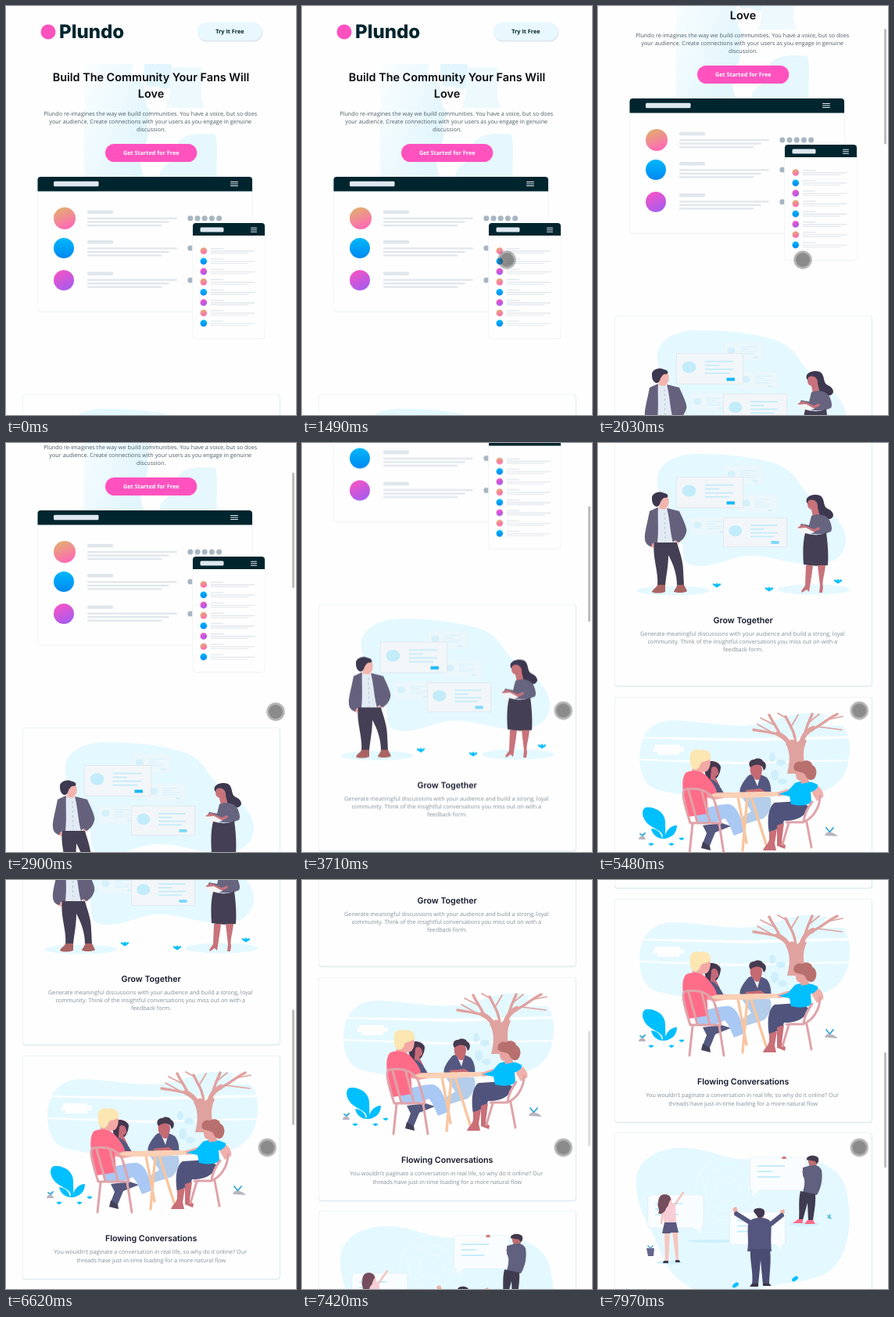
Animation, 371 px wide and 522 px high, one loop 8000 ms. Source, as an HTML page:

```html
<!DOCTYPE html>
<html lang="en">
<head>
<meta charset="utf-8">
<title>Plundo landing page</title>
<style>
html, body { margin: 0; width: 100%; height: 100%; overflow: hidden; background: #fefefe; }
svg { position: absolute; left: 0; top: 0; display: block; }
text { text-rendering: geometricPrecision; }
.logo { font: 800 24px Inter, sans-serif; fill: #00252e; }
.head { font: 600 14.4px Inter, sans-serif; fill: #080a10; text-anchor: middle; }
.title { font: 600 10.65px Inter, sans-serif; fill: #12172a; text-anchor: middle; }
.copy { font: 400 7.27px "Open Sans", sans-serif; fill: #4c5d66; text-anchor: middle; }
.soft { fill: #82909a; }
.btn { font: 700 7.27px "Open Sans", sans-serif; text-anchor: middle; }
.line { fill: none; stroke-linecap: round; stroke-linejoin: round; }
</style>
</head>
<body>
<svg width="371" height="522" viewBox="0 0 371 522">
  <defs>
    <linearGradient id="orange" x1=".2" y1="0" x2=".6" y2="1"><stop stop-color="#e2b06c"/><stop offset="1" stop-color="#ff68b8"/></linearGradient>
    <linearGradient id="blue" x1="0" y1="0" x2="0" y2="1"><stop stop-color="#00b8fa"/><stop offset="1" stop-color="#0088f2"/></linearGradient>
    <linearGradient id="purple" x1=".2" y1="0" x2=".7" y2="1"><stop stop-color="#f853c4"/><stop offset="1" stop-color="#a45cf0"/></linearGradient>
    <linearGradient id="haze" x1="0" y1="0" x2="1" y2=".6"><stop stop-color="#fbfeff"/><stop offset="1" stop-color="#e0f5fc"/></linearGradient>
    <g id="sprout" fill="#00bfff">
      <ellipse rx="1.4" ry="3" cy="-1.5"/>
      <ellipse rx="1.4" ry="3.4" transform="rotate(-58) translate(0 -2.6)"/>
      <ellipse rx="1.4" ry="3.4" transform="rotate(58) translate(0 -2.6)"/>
    </g>
    <g id="bubble">
      <rect width="71" height="42" rx="3" fill="#fafdff" stroke="#e0edf3" stroke-width=".7"/>
      <path class="line" stroke="#c6edfa" stroke-width="2" d="M10 11H44M10 18H28M10 25H38"/>
    </g>
  </defs>

  <g id="page">
    <!-- hero -->
    <path fill="url(#haze)" d="M100 74H163C158 88 164 96 176 98C180 112 176 128 186 136C176 150 186 164 178 176C168 186 172 205 176 218H100Z"/>
    <path fill="#e4f6fd" d="M177 74H212V104C203 110 196 100 188 103C180 106 176 98 177 74Z"/>
    <path fill="#eef9fe" d="M212 78H250C254 100 246 112 254 130H204C212 118 208 98 212 78Z"/>
    <path fill="#e6f7fd" d="M196 218C198 200 214 204 216 186C218 168 232 160 268 164C272 182 268 200 270 218Z"/>
    <circle cx="54" cy="33" r="9.5" fill="#ff52bf"/>
    <text class="logo" x="68" y="41">Plundo</text>
    <rect x="245.5" y="22.5" width="83" height="23" rx="11.5" fill="#dde5e9"/>
    <rect x="245" y="21" width="82.5" height="23" rx="11.5" fill="#e8f8fe"/>
    <text class="btn" x="286.4" y="35.2" fill="#00252e">Try It Free</text>
    <text class="head"><tspan x="185.5" y="96">Build The Community Your Fans Will</tspan><tspan x="185.5" y="117">Love</tspan></text>
    <text class="copy">
      <tspan x="185.7" y="140.2">Plundo re-imagines the way we build communities. You have a voice, but so does</tspan>
      <tspan x="185.7" y="150.2">your audience. Create connections with your users as you engage in genuine</tspan>
      <tspan x="185.7" y="160.2">discussion.</tspan>
    </text>
    <rect x="127" y="176" width="117.3" height="23" rx="11.5" fill="#ff52bf"/>
    <text class="btn" x="185.7" y="190.2" fill="#fff">Get Started for Free</text>
    <g id="mock"></g>

    <!-- card 1 -->
    <g class="card" data-y="496" data-h="314"></g>
    <g transform="translate(0 418)">
      <g fill="#e4f8ff">
        <path d="M76 125C78 108 100 96 125 96C160 96 185 98 215 105C240 111 250 120 260 137C275 160 318 175 317 207C315 230 296 238 272 237C240 236 218 224 190 226C165 229 150 240 128 239C105 238 110 225 107 200C103 170 72 155 76 125Z"/>
        <ellipse cx="96" cy="270.5" rx="46.5" ry="6"/><ellipse cx="276" cy="269" rx="46.5" ry="6.5"/>
      </g>
      <g id="screens"></g>
      <!-- man -->
      <path fill="#f2b5ae" d="M79 153L89 150C92 156 91 163 87 165L86 174H77Z"/>
      <path fill="#3d3850" d="M69 153C68 146 78 142 85 146C90 147 91 151 87 152C83 151 82 155 80 157C79 161 77 164 74 163C70 161 69 157 69 153Z"/>
      <path fill="#e2eaf3" d="M77 166L90 167L97 210H73Z"/>
      <path class="line" stroke="#9aa9ba" stroke-width=".9" stroke-dasharray="1 5" d="M85 172L86 208"/>
      <path fill="#ecaaa4" d="M66 207L73 210L71 216L66 214ZM99 204L105 208L98 211Z"/>
      <path fill="#65617d" d="M77 164L66 169C63 185 59 198 60 204C60 209 63 213 68 214L70 210L76 209C78 192 76 178 77 164ZM88 165L104 169C109 180 115 192 113 196C111 203 107 207 103 209L99 206L96 209C92 196 92 180 88 165Z"/>
      <path fill="#443f54" d="M72 209H101C104 220 109 232 109 245L110 264H101C101 250 97 238 90 225C90 240 87 252 86 264H76C78 248 69 226 72 209Z"/>
      <path fill="#a96462" d="M76 263H86L86 272C80 274 72 274 69 272C70 268 75 267 76 263ZM101 263H110L114 271C110 274 100 273 97 272C97 269 101 267 101 263Z"/>
      <!-- woman -->
      <path fill="#3d3850" d="M267 158C264 150 276 146 284 149C291 153 287 163 294 166C301 169 304 176 297 179C287 180 281 174 277 168Z"/>
      <path fill="#c8737b" d="M269 156C276 152 282 157 281 164L284 176L275 177L273 167C268 166 267 161 269 156Z"/>
      <path fill="#676480" d="M273 175C282 171 292 174 296 180C299 187 300 192 298 195C288 200 275 199 265 196L257 191L260 185L270 187Z"/>
      <path fill="#c8737b" d="M255 190L262 186L276 192L283 189L284 192L272 198Z"/>
      <path fill="#f2f5f8" d="M254 191L266 190L277 196L264 201Z"/>
      <path fill="#443f54" d="M265 197C276 200 286 200 292 196C294 210 295 225 294 238C284 239 273 239 263 237C262 223 262 208 265 197Z"/>
      <path fill="#c8737b" d="M266 238H275C274 248 272 258 271 266L270 272L267 269L261 273L260 271L265 264ZM281 238H291C290 250 286 260 288 266L287 273H283L284 264Z"/>
      <use href="#sprout" x="152" y="265"/><use href="#sprout" x="219" y="270"/><use href="#sprout" x="307" y="260"/>
    </g>
    <text class="title" x="185.7" y="730.3">Grow Together</text>
    <text class="copy soft">
      <tspan x="185.7" y="745.9">Generate meaningful discussions with your audience and build a strong, loyal</tspan>
      <tspan x="185.7" y="755.9">community. Think of the insightful conversations you miss out on with a</tspan>
      <tspan x="185.7" y="765.9">feedback form.</tspan>
    </text>

    <!-- card 2 -->
    <g class="card" data-y="824.5" data-h="284.5"></g>
    <g transform="translate(0 600)">
      <path fill="#e4f8ff" d="M53 300C54 270 70 253 100 254C140 256 165 263 200 260C225 257 240 247 262 245C295 243 322 252 322 290C322 330 300 345 270 348C200 356 100 352 72 341C58 334 53 318 53 300Z"/>
      <path fill="#fefefe" d="M54 275L190 277L322 274V277L190 281L54 277ZM53 303L180 307L322 304V306L180 310L53 305ZM73 285H105V288H110V294H104V298H76V294H71V289H73ZM289 249H322V261H288V256H294V253H289Z"/>
      <!-- tree -->
      <path fill="#dfa29f" d="M242 322C246 306 246 294 240 284L248 278L255 282L262 276L267 280C261 292 262 306 268 322Z"/>
      <g class="line" stroke="#dfa29f">
        <path stroke-width="6" d="M246 286C241 277 236 274 230 271M260 284C262 273 267 268 275 264"/>
        <path stroke-width="3.4" d="M231 272C220 269 210 268 199 266M233 273C229 262 224 258 219 247M253 284C252 268 246 262 240 249M264 274C266 262 270 256 274 246M274 265C284 262 290 254 306 246"/>
        <path stroke-width="1.7" d="M222 269L204 259M226 260L208 251M247 262L256 247M268 258L283 246M280 262L312 266M293 253L313 249M241 251L230 245"/>
      </g>
      <g fill="#cfeffa"><ellipse cx="223" cy="301" rx="4" ry="6"/><ellipse cx="234" cy="308" rx="6" ry="4"/><ellipse cx="226" cy="324" rx="5" ry="7"/><ellipse cx="236" cy="332" rx="6" ry="4"/></g>
      <!-- seated at the back -->
      <path fill="#45364f" d="M135 311C140 303 154 305 157 313C157 320 153 330 145 332L138 326Z"/>
      <path fill="#c46a78" d="M145 315C149 310 155 315 154 323L150 326L156 338L143 338Z"/>
      <path fill="#55587f" d="M144 329C152 331 156 338 161 347L140 350Z"/>
      <path fill="#545881" d="M193 324C202 321 210 323 216 327C221 333 222 342 221 349H183C178 343 186 331 193 324Z"/>
      <path fill="#f0f3f8" d="M198 324L208 323L204 338Z"/>
      <path fill="#c56a72" d="M195 312C198 307 210 309 210 316C210 322 208 325 207 329C204 331 200 330 199 326C195 324 194 318 195 312ZM188 343L208 341L214 345L194 349Z"/>
      <path fill="#453a50" d="M195 314C191 309 195 303 200 304C204 301 210 303 211 306C216 308 216 315 212 318L210 313C205 309 200 310 195 314Z"/>
      <path fill="#b4cdea" d="M184 352H220C224 360 220 372 212 379L186 387L177 382L196 370Z"/>
      <!-- left -->
      <path fill="#55587f" d="M134 388L158 385L170 389L150 397L143 414L134 411L139 398Z"/>
      <path fill="#424058" d="M134 409L143 414L144 420L132 417Z"/>
      <path fill="#a9c8f3" d="M126 368C142 366 156 360 168 361C180 365 183 380 187 396L174 401C170 392 167 384 162 379C152 385 140 387 126 386Z"/>
      <path fill="#f2a9a5" d="M122 306L143 302C145 308 143 316 139 319L134 320L133 327L120 322ZM139 345L152 346L176 346L178 350L150 355L136 352Z"/>
      <path fill="#fce6b2" d="M118 300C117 292 126 290 131 292C137 290 145 293 144 303C140 307 133 305 131 310C129 317 123 319 120 314C117 309 118 304 118 300Z"/>
      <path fill="#ff6c88" d="M112 321C120 316 132 318 138 324C144 330 150 338 152 345L141 352L139 348L141 373L116 377C113 360 103 334 112 321Z"/>
      <!-- table -->
      <path class="line" stroke="#f8c5a0" stroke-width="3.4" d="M179 352L190 410M191 352L185 420M196 352L215 412"/>
      <path fill="#fbd0b6" d="M140 349C160 345 225 344 243 346C246 349 222 352 185 353C160 353 142 352 140 349Z"/>
      <!-- right -->
      <path fill="#50547c" d="M258 357L270 364C266 378 250 383 238 382L236 388L230 392L219 398C216 380 218 364 226 359Z"/>
      <path fill="#c96f78" d="M219 396L229 393L226 411L228 420H211C213 414 218 412 219 406ZM229 388L238 385L235 408L240 414L239 418L229 414Z"/>
      <path fill="#f0b1ab" d="M229 346L244 341L250 348L231 351ZM274 334C284 337 290 346 288 352L280 357L274 347Z"/>
      <path fill="#00bfff" d="M252 334C262 330 274 332 281 336C282 341 276 345 272 345L273 358C268 364 254 363 247 361L245 351L231 348L243 344Z"/>
      <path fill="#e6a3a0" d="M253 318L267 316L270 333L260 335L259 331C254 331 252 325 253 318Z"/>
      <path fill="#b8706e" d="M251 317C248 309 256 305 261 307C266 303 274 306 274 311C280 313 281 322 277 328C273 332 267 330 265 323C262 319 256 321 251 317Z"/>
      <g class="line" stroke="#dfa3a9" stroke-width="3">
        <path d="M118 385C112 366 105 343 112 342C130 339 146 345 150 360L157 385ZM116 344L127 384M133 345L143 384M121 386L117 424M155 386L161 424"/>
        <path d="M284 350C284 366 274 380 262 384H241M274 358C268 366 264 374 263 383M267 384L273 416M244 385L236 412"/>
      </g>
      <path fill="#00bfff" d="M82 405C86 396 74 394 65 387C55 379 55 366 62 365C74 364 86 372 86 384C86 392 87 398 85 405ZM85 405C86 396 92 388 101 388C101 398 94 404 85 405ZM82 405C74 404 69 398 68 392C76 393 81 397 82 405Z"/>
      <use href="#sprout" transform="translate(68 413) scale(.65)"/><use href="#sprout" transform="translate(107 406) scale(.65)"/><use href="#sprout" transform="translate(94 413) scale(.65)"/>
      <path fill="#b9b4bf" d="M52 406C52 401 60 400 61 406ZM290 401C292 394 301 396 307 402Z"/>
      <path class="line" stroke="#36a8d8" stroke-width="1.8" d="M57 401L54 399M57 401L60 398M296 396L292 391M297 396L301 391"/>
    </g>
    <text class="title" x="185.7" y="1060.9">Flowing Conversations</text>
    <text class="copy soft">
      <tspan x="185.7" y="1077.2">You wouldn't paginate a conversation in real life, so why do it online? Our</tspan>
      <tspan x="185.7" y="1087.6">threads have just-in-time loading for a more natural flow</tspan>
    </text>

    <!-- card 3 -->
    <g class="card" data-y="1123" data-h="290"></g>
    <g transform="translate(0 800)">
      <path fill="#e4f8ff" d="M49 385C49 355 80 340 115 342C150 345 165 359 200 356C240 351 302 350 316 390C326 425 325 478 295 500C260 520 220 510 190 530C150 545 115 520 98 505C80 485 78 465 67 445C57 428 49 410 49 385Z"/>
      <g fill="none" stroke="#f2fbff" stroke-width=".8"><circle cx="165" cy="394" r="16"/><circle cx="165" cy="394" r="28"/><circle cx="165" cy="394" r="40"/></g>
      <ellipse cx="145" cy="461" rx="31" ry="2" fill="#cdf0fc"/>
      <ellipse cx="264" cy="439" rx="20" ry="3" fill="#d2f1fb"/>
      <ellipse cx="92" cy="488" rx="17" ry="2.5" fill="#d2f1fb"/>
      <use href="#bubble" x="64" y="402"/><use href="#bubble" x="168.5" y="423.5"/><use href="#bubble" x="194.5" y="354"/>
      <path fill="#fafdff" d="M122 443L132 451V443ZM228 465L235 473V465ZM198 395V404L207 395Z"/>
      <!-- woman -->
      <path class="line" stroke="#f3c6bf" stroke-width="2.6" d="M97 416L109 399M83 422L81 438"/>
      <path fill="#f3c6bf" d="M88 406H94L95 415L88 417Z"/>
      <path fill="#f9cdd6" d="M84 416C89 411 96 412 99 415L100 438H85C83 430 82 422 84 416Z"/>
      <path fill="#f3c6bf" d="M85 449H92L90 487H86ZM95 449H102L103 486H100Z"/>
      <path fill="#5b597f" d="M85 437H100L103 450H94L92 451H82Z"/>
      <path fill="#754d5c" d="M80 403C85 399 94 402 93 408C90 411 91 416 87 419C86 424 80 428 77 425C80 420 75 417 77 412C77 408 78 405 80 403Z"/>
      <path fill="#3f3b50" d="M84 486H90V489H83ZM99 485H104L105 488H99Z"/>
      <path fill="#66658a" d="M62 470H72L71 480H64Z"/><path class="line" stroke="#55a5c8" stroke-width="1.5" d="M67 470L64 467M67 470L70 467"/>
      <!-- speaker -->
      <path fill="#f0b0a8" d="M172 419L177 417L179 423L174 425ZM202 423H212V434H204ZM233 422L238 420L239 425L234 427Z"/>
      <path fill="#403750" d="M199 422C201 417 213 418 213 423C214 429 209 432 205 431C203 427 200 426 199 422Z"/>
      <path class="line" stroke="#55567f" stroke-width="6" d="M177 426L196 438M235 428L220 440"/>
      <path fill="#55567f" d="M194 435C200 430 213 430 219 434C224 439 220 450 222 474H191C194 460 189 442 194 435Z"/>
      <path fill="#4b4c74" d="M195 471H220C222 488 219 503 219 517H211L208 485L205 517H197C199 500 194 487 195 471Z"/>
      <path fill="#3b3448" d="M197 515H205V519H194ZM211 515H219L222 518H211Z"/>
      <!-- man -->
      <path fill="#bd6e70" d="M268 356L280 355C282 363 279 368 271 367ZM261 372L265 368L267 373L263 376Z"/>
      <path fill="#43384c" d="M267 357C266 351 279 350 282 355C283 361 280 364 278 359Z"/>
      <path fill="#60607f" d="M262 367C272 364 281 361 286 370C288 382 285 394 280 402H261C264 392 266 384 262 377Z"/>
      <path fill="#3f3b50" d="M259 397L278 401C279 414 276 425 275 435H269L268 412L262 434H257C258 420 256 408 259 397Z"/>
      <path fill="#ff6c88" d="M256 433H262V438H249ZM268 434H275L278 439H264Z"/>
      <path fill="#d27b80" d="M235 356C236 351 241 352 241 356Z"/>
      <g fill="#00bfff"><ellipse cx="176" cy="517" rx="4.5" ry="2.4" transform="rotate(-35 176 517)"/><ellipse cx="252" cy="509" rx="4.5" ry="2.4" transform="rotate(-35 252 509)"/></g>
      <path class="line" stroke="#3ab5dc" stroke-width="1.3" d="M298 432L294 428M296 430L297 427M297 431L294 431"/>
    </g>
  </g>

  <rect id="thumb" x="366" width="3" height="147" rx="1" fill="#bdbdbd"/>
  <g id="cursor" fill="#404040"><circle r="11.7" fill-opacity=".38"/><circle r="9" fill-opacity=".36"/></g>
</svg>
<script>
const $ = id => document.getElementById(id);
const box = (x, y, w, h, fill, r = h / 2) =>
  `<rect x="${x}" y="${y}" width="${w}" height="${h}" rx="${r}" fill="${fill}"/>`;
const dot = (x, y, r, fill) => `<circle cx="${x}" cy="${y}" r="${r}" fill="${fill}"/>`;
const hues = ['url(#orange)', 'url(#blue)', 'url(#purple)'];
const dark = '#00252e', pale = '#dfe6ec';

// window with a dark top bar
function frame(x, y, w, h, bar) {
  return box(x - .8, y - .3, w + 1.6, h + 1.6, '#f0f3f5', 5) + box(x, y, w, h, '#fefefe', 4.5) +
    `<path fill="${dark}" d="M${x} ${y + bar}V${y + 4}q0-4 4-4H${x + w - 4}q4 0 4 4V${y + bar}Z"/>`;
}
const menu = (x, y, w) => [0, 2.5, 5].map(d => box(x, y + d, w, 1, '#dfe8ee')).join('');

function mock() {
  let out = frame(40.5, 218, 274.5, 171.5, 18.4) + box(61, 223.7, 57.5, 6.6, '#dfe7ef', 1.5) + menu(287, 224, 10);
  [271, 309, 350].forEach((y, i) => {
    const top = [0, .3, -.5][i];
    out += dot(i ? 74 : 75, y, i ? 13 : 14, hues[i]) + box(104, y - 10.3 + top, 33, 4.6, pale, 1.5);
    [115, 105, 95.5].forEach((w, k) => out += box(103.8, y - 1 + top + k * 4.5, w, 2.2, pale));
    for (let k = 0; k < (i ? 1 : 5); k++) out += dot(235.8 + k * 9.2, y, 3.5, '#a7b6c2');
  });
  out += frame(239, 277, 92, 147, 16) + box(248.5, 282.6, 30, 6, '#dfe7ef', 1.5) + menu(313, 282.8, 8);
  for (let i = 0; i < 8; i++) {
    const y = 312.5 + i * 13.2;
    out += dot(252.8, y, 4.3, hues[i % 3]) + box(261.5, y - 3.5, 17, 1.4, '#e2e8ed') +
      box(261.5, y - .2, 57, 1.1, '#dce3e9') + box(261.5, y + 2.3, 49, 1.1, '#e2e8ed');
  }
  return out;
}

function screen(x, y, s, fill, ink, btn, edge) {
  const lines = [[37, 10], [19, 15], [37, 20], [32, 25]].map(([w, d]) => box(36, d - .8, w, 1.7, ink)).join('');
  return `<g transform="translate(${x} ${y}) scale(${s})"><rect width="85" height="39" fill="${fill}" stroke="${edge}" stroke-width=".8"/>` +
    `<ellipse cx="16" cy="17.5" rx="9" ry="7.5" fill="${ink}"/>${lines}${box(64, 31, 10.5, 4, btn, 0)}</g>`;
}

$('mock').innerHTML = mock();
$('screens').innerHTML =
  [[161.5, 111.5], [118, 176.5], [180, 148.5]].map(([x, y]) => screen(x, y, .58, '#ecf7fc', '#d4f0fb', '#d4f0fb', '#e6f2f8')).join('') +
  screen(100.5, 125.5, 1, '#f3f6f9', '#c2ecfa', '#16b8f6', '#dfe5ea') +
  screen(160.5, 177.5, .953, '#f3f6f9', '#c2ecfa', '#7cd8fa', '#dfe5ea');
document.querySelectorAll('.card').forEach(c => {
  const y = +c.dataset.y, h = +c.dataset.h;
  c.innerHTML = box(21, y - .5, 330, h + 1.8, '#dfecee', 4) + box(21.5, y, 328.5, h - .3, '#fefefe', 3.5);
});

// motion: [time, value], each value held until the next
const LOOP = 8000;
const scroll = [
  [0, 0], [1890, 20], [1960, 74], [2030, 100],
  [2900, 132], [2970, 181], [3040, 200],
  [3570, 204], [3640, 245], [3710, 289.5], [3780, 300],
  [4110, 302], [4180, 318], [4250, 355], [4310, 389], [4380, 400],
  [4730, 403], [4800, 418], [4870, 474], [4940, 500],
  [6410, 505], [6480, 540], [6550, 586], [6620, 600],
  [6880, 632], [6950, 681], [7020, 700],
  [7700, 706], [7770, 746], [7840, 789], [7970, 800]
];
const fade = [[0, 0], [1890, 1], [2430, .5], [2570, 0], [2900, 1], [5340, .5], [5480, 0],
  [6410, 1], [7420, .5], [7560, 0], [7700, 1]];

function glide(t0, t1, n, from, to, lead) {
  return Array.from({ length: n }, (_, i) => {
    const p = lead ? (i + 1) / n : i / (n - 1), e = p * p * (3 - 2 * p);
    return [t0 + (t1 - t0) * i / (n - 1), from.map((v, k) => v + (to[k] - v) * e)];
  });
}
const path = [[0, [336, 500]],
  ...glide(730, 1490, 12, [336, 500], [262, 324]),
  ...glide(2360, 2570, 4, [262, 324], [345, 343], true),
  ...glide(3240, 3450, 4, [345, 343], [334.3, 341.5], true)];

function play(el, prop, steps, show = v => v) {
  const keys = steps.map(([t, v]) => ({ offset: t / LOOP, [prop]: show(v), easing: 'step-end' }));
  keys.push({ ...keys[keys.length - 1], offset: 1 });
  el.animate(keys, { duration: LOOP, iterations: Infinity });
}
play($('page'), 'transform', scroll, s => `translate(0px, ${-s}px)`);
play($('thumb'), 'transform', scroll, s => `translate(0px, ${2 + s * .2725}px)`);
play($('thumb'), 'opacity', fade);
play($('cursor'), 'transform', path, ([x, y]) => `translate(${x}px, ${y}px)`);
play($('cursor'), 'opacity', [[0, 0], [730, 1]]);
</script>
</body>
</html>
```
